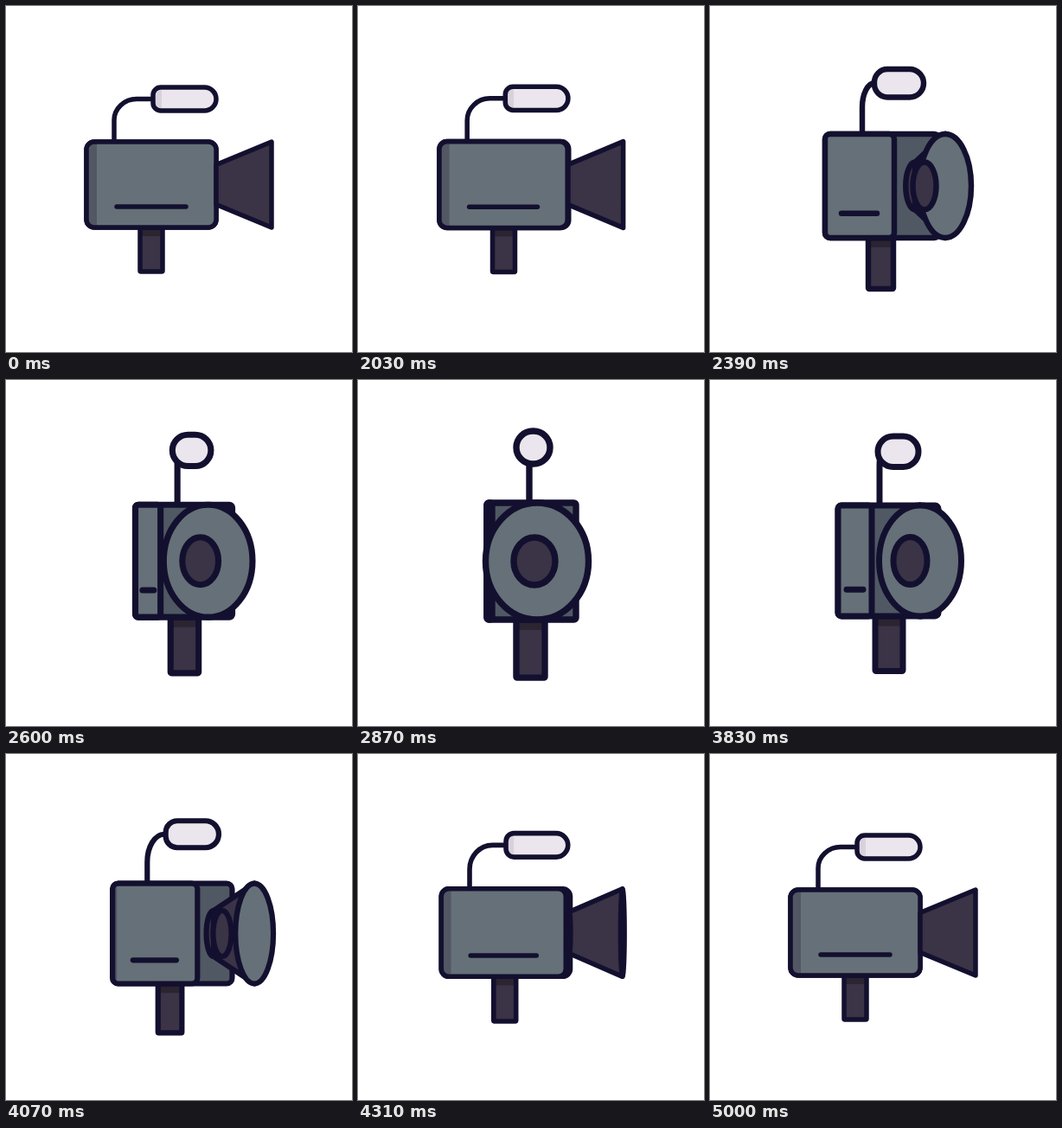
Write an HTML page with a canvas that moves like this. It is 400x400 px and loops after 5060 ms.

```html
<!DOCTYPE html>
<html lang="en">
<head>
<meta charset="utf-8">
<title>Turning video camera</title>
<style>
  html, body { margin: 0; width: 100%; height: 100%; overflow: hidden; background: #fff; }
  canvas { display: block; width: 400px; height: 400px; }
</style>
</head>
<body>
<canvas id="stage"></canvas>
<script>
const LOOP = 5060, TURN_START = 2030, TURN_END = 5000, STEP = 30;
const INK = '#13102f', GREY = '#667078', GREY_DARK = '#505963', GREY_SHADE = '#525763';
const PLUM = '#3b3346', PLUM_DARK = '#2b2431', PALE = '#ebe5ed', PALE_SHADE = '#d9d1dd';

// Turn amount over time: 0 is the side view, 1 faces the viewer
const TURN = [
  [2000, 0], [2030, .012], [2210, .17], [2390, .47], [2550, .745], [2690, .88],
  [2870, .95], [3080, .987], [3220, .99], [3420, .975], [3650, .91], [3830, .74],
  [4160, .21], [4310, .04], [4450, -.025], [4660, -.036], [5000, 0]
];

// Each part's place at four turn amounts
const KNOTS = [0, .47, .74, .95];
const POSES = {
  left: [93, 133, 148, 149],
  edge: [243, 213, 187, 155],
  right: [243, 265, 264, 252],
  top: [157, 148, 145, 142],
  bottom: [256, 268, 273, 277],
  slotA: [128, 152, 158, 155],
  slotB: [208, 193, 177, 152],
  armX: [125, 176, 196, 198],
  armY: [132, 117, 100, 96],
  armEnd: [151, 190, 199, 200],
  micL: [170, 190, 194, 183],
  micR: [243, 247, 241, 222],
  micTop: [94, 73, 65, 59],
  gripL: [155, 183, 191, 183],
  gripR: [181, 212, 223, 216],
  mouthX: [307, 272, 243, 207],
  mouthR: [0, 30, 47.5, 59.5],
  lensX: [243, 248, 231.5, 204],
  lensR: [0, 13.5, 19.5, 24]
};

const canvas = document.getElementById('stage');
const ctx = canvas.getContext('2d');
const ratio = window.devicePixelRatio || 1;
canvas.width = canvas.height = 400 * ratio;

const clamp = (v, lo, hi) => Math.min(hi, Math.max(lo, v));

function turnAt(time) {
  if (time < TURN_START || time >= TURN_END) return 0;
  const t = TURN_START + Math.floor((time - TURN_START) / STEP) * STEP;
  const i = TURN.findIndex((k, n) => n && t <= k[0]) - 1;
  const slope = n => {
    if (n === 0 || n === TURN.length - 1) return 0;
    const [t0, v0] = TURN[n - 1], [t1, v1] = TURN[n], [t2, v2] = TURN[n + 1];
    const a = (v1 - v0) / (t1 - t0), b = (v2 - v1) / (t2 - t1);
    return a * b <= 0 ? 0 : 2 * a * b / (a + b);
  };
  const [ta, va] = TURN[i], [tb, vb] = TURN[i + 1];
  const d = tb - ta, u = (t - ta) / d, w = 1 - u;
  return va * (1 + 2 * u) * w * w + slope(i) * d * u * w * w
    + vb * u * u * (3 - 2 * u) - slope(i + 1) * d * u * u * w;
}

// Cubic curve through the four knots
function poseAt(p) {
  const weights = KNOTS.map((k, i) =>
    KNOTS.reduce((w, other, j) => i === j ? w : w * (p - other) / (k - other), 1));
  const pose = {};
  for (const name in POSES)
    pose[name] = POSES[name].reduce((sum, v, i) => sum + v * weights[i], 0);
  if (p > 0 && p < .47) pose.mouthX += 8 * Math.sin(Math.PI * p / .47);
  pose.right = Math.max(pose.right, pose.edge);
  return pose;
}

// Outlined rounded box with an optional shaded strip: [x, y, width, height, colour]
function box(l, t, r, b, radius, fill, strip) {
  const path = new Path2D();
  path.roundRect(l, t, Math.max(0, r - l), b - t, radius);
  ctx.fillStyle = fill;
  ctx.fill(path);
  if (strip) {
    ctx.save();
    ctx.clip(path);
    ctx.fillStyle = strip[4];
    ctx.fillRect(...strip.slice(0, 4));
    ctx.restore();
  }
  ctx.stroke(path);
}

function oval(x, y, rx, ry, fill) {
  if (rx < 1) return;
  ctx.beginPath();
  ctx.ellipse(x, y, rx, ry, 0, 0, Math.PI * 2);
  ctx.fillStyle = fill;
  ctx.fill();
  ctx.stroke();
}

function drawGrip(s, p) {
  box(s.gripL, s.bottom, s.gripR, s.bottom + 51 + 17 * p, 1, PLUM,
    [s.gripL, s.bottom, s.gripR - s.gripL, 10 + 2 * p, PLUM_DARK]);
}

function drawMic(s, p) {
  const h = 27 + 11.5 * p, y = s.micTop + h / 2;
  const bendY = Math.max(s.armY, y);
  ctx.beginPath();
  ctx.moveTo(s.armX, s.top);
  ctx.lineTo(s.armX, bendY);
  ctx.bezierCurveTo(s.armX, bendY + (y - bendY) * .55,
    s.armEnd + (s.armX - s.armEnd) * .55, y, s.armEnd, y);
  ctx.lineTo(Math.max(s.armEnd, s.micL), y);
  ctx.stroke();
  const round = h / 2, back = round * clamp(.65 + .6 * p, 0, 1);
  const shade = Math.max(0, 10 - 22 * p);
  box(s.micL, s.micTop, s.micR, s.micTop + h, [back, round, round, back], PALE,
    [s.micL, s.micTop, shade, h, PALE_SHADE]);
}

function drawBody(s, p) {
  const radius = clamp(9 - 7 * p, 2, 9);
  const shade = Math.max(0, 12 - 20 * p);
  box(s.left, s.top, s.right, s.bottom, radius, GREY_DARK);
  box(s.left, s.top, s.edge, s.bottom, radius, GREY,
    [s.left, s.top, shade, s.bottom - s.top, GREY_SHADE]);
  if (s.slotB > s.slotA) {
    const y = s.bottom - 24 - 9 * p;
    ctx.beginPath();
    ctx.moveTo(s.slotA, y);
    ctx.lineTo(s.slotB, y);
    ctx.stroke();
  }
}

function drawLens(s, p) {
  const y = (s.top + s.bottom) / 2, ry = (s.bottom - s.top) / 2;
  const lensRy = clamp(23 + 10 * p, 22, 27.5);
  const neckX = s.lensX - 44 * p * (1 - p);
  oval(neckX, y, s.lensR * .8, lensRy, PLUM);
  if (s.mouthX - s.mouthR * .4 > neckX) {
    ctx.beginPath();
    ctx.moveTo(neckX, y - lensRy);
    ctx.lineTo(s.mouthX, y - ry);
    ctx.lineTo(s.mouthX, y + ry);
    ctx.lineTo(neckX, y + lensRy);
    ctx.closePath();
    ctx.fillStyle = PLUM;
    ctx.fill();
    ctx.stroke();
  }
  oval(s.mouthX, y, s.mouthR, ry, GREY);
  oval(s.lensX, y, s.lensR, lensRy, PLUM);
}

function draw(time) {
  const p = turnAt(time), s = poseAt(p);
  ctx.setTransform(ratio, 0, 0, ratio, 0, 0);
  ctx.fillStyle = '#fff';
  ctx.fillRect(0, 0, 400, 400);
  ctx.strokeStyle = INK;
  ctx.lineWidth = 5.5 + 2 * p;
  ctx.lineCap = ctx.lineJoin = 'round';
  drawGrip(s, p);
  drawMic(s, p);
  drawBody(s, p);
  drawLens(s, p);
}

const start = performance.now();
function tick() {
  draw((performance.now() - start) % LOOP);
  requestAnimationFrame(tick);
}
tick();
</script>
</body>
</html>
```
